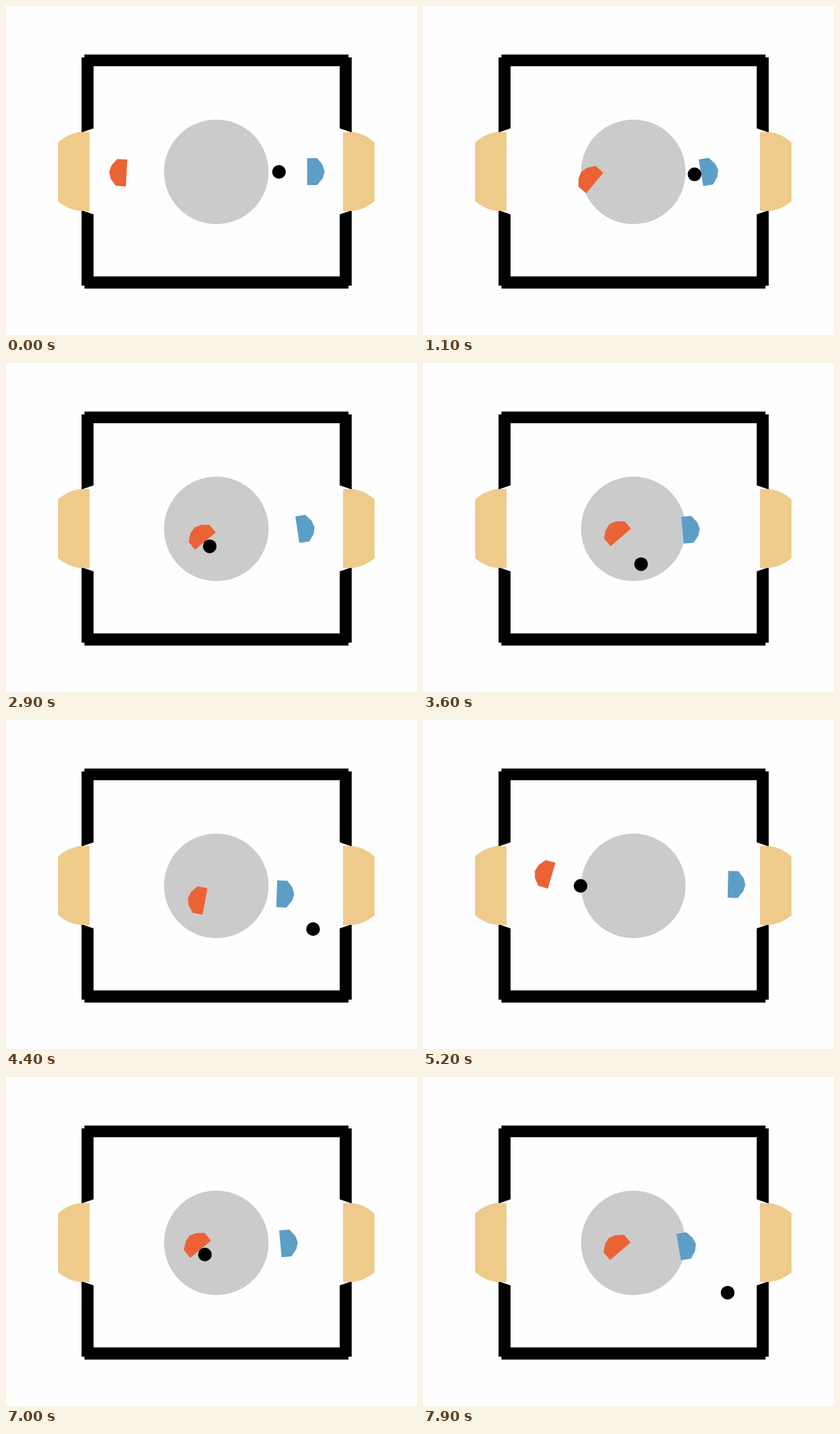
Animation of 600x480 px, one loop 8000 ms. Source, as an HTML page with a canvas:

```html
<!DOCTYPE html>
<html lang="en">
<head>
<meta charset="utf-8">
<title>Air hockey</title>
<style>
html, body { margin: 0; width: 100%; height: 100%; overflow: hidden; background: #fefefe; }
canvas { display: block; }
</style>
</head>
<body>
<canvas id="stage" width="600" height="480"></canvas>
<script>
const ctx = document.getElementById('stage').getContext('2d');
const STEP = 100, STEPS = 80, FLOOR = 382;

// Paddle waypoints: step, x, y, angle in degrees.
// The puck waits, drifts from `push` on, is caught by red at `grab` and shot at `fire`.
const rounds = [
  {
    begin: 0, push: 11, grab: 22, fire: 35, power: 1,
    rest: [396.4, 245.6], drift: [-10.25, 4.36], aim: [298.9, 269.5],
    red: [[0, 171.1, 243.3, 3], [11, 247, 254.9, 39.6], [22, 285.2, 262.1, 44.5],
      [36, 285.5, 250.8, 49.7], [44, 285.7, 263.9, 10.6]],
    blue: [[0, 444.6, 241.7, 0], [11, 410.6, 242.5, -9.8], [27, 437.5, 242.5, -9],
      [36, 383.6, 243.5, -5.2], [44, 400.2, 253.7, 2]]
  },
  {
    begin: 49, push: 57, grab: 57, fire: 71, power: 1.07,
    rest: [230, 242], drift: [0, 0], aim: [299.6, 266],
    red: [[49, 170.5, 241.7, 0], [55, 204, 208, 40], [61, 237.2, 226.8, 58.4],
      [71, 284, 249, 50], [79, 284.8, 250.5, 49.8]],
    blue: [[49, 444.6, 241.7, 0], [58, 460, 235, 4], [79, 378.1, 247.4, -10]]
  }
];

const clamp = v => Math.min(1, Math.max(0, v));
const mix = (a, b, k) => a.map((v, i) => v + (b[i] - v) * k);

// Smooth curve through timed waypoints, at rest at both ends
function follow(keys, n) {
  const last = keys.length - 1;
  const next = keys.findIndex(key => key[0] > n);
  if (next < 0) return keys[last].slice(1);
  const i = next - 1, a = keys[i], b = keys[next];
  const span = b[0] - a[0], k = (n - a[0]) / span;
  const slope = (j, c) => j === 0 || j === last ? 0
    : (keys[j + 1][c] - keys[j - 1][c]) / (keys[j + 1][0] - keys[j - 1][0]);
  return [1, 2, 3].map(c =>
    a[c] + (b[c] - a[c]) * k * k * (3 - 2 * k)
    + span * k * (1 - k) * (slope(i, c) * (1 - k) - slope(next, c) * k));
}

// Slowing shot that rebounds from the lower wall
function shot(n, [x, y], power) {
  const drop = y + power * (24.3 * n - 0.36 * n * n);
  return [x + power * (19.8 * n - 0.356 * n * n), FLOOR - Math.abs(FLOOR - drop)];
}

function inFront([x, y, angle]) {
  const a = angle * Math.PI / 180;
  return [x + 14.8 * Math.cos(a), y + 14.8 * Math.sin(a)];
}

function puckAt(round, n, red) {
  const { push, grab, fire, rest, drift, aim, power } = round;
  if (n >= fire) return shot(n - fire, aim, power);
  const time = Math.max(0, Math.min(n, grab) - push);
  const free = rest.map((v, i) => v + drift[i] * time);
  // Blue nudges the puck slightly before sending it off
  if (n < push) return mix(free, [398.5, 242], round.begin ? 0 : clamp((push - n) / 3));
  return mix(free, inFront(red), clamp((n - grab) / 3));
}

function fillPath(color, trace) {
  ctx.fillStyle = color;
  ctx.beginPath();
  trace();
  ctx.fill();
}

const polygon = (points, color) =>
  fillPath(color, () => points.forEach(([x, y]) => ctx.lineTo(x, y)));
const disc = ([x, y], r, color) =>
  fillPath(color, () => ctx.arc(x, y, r, 0, Math.PI * 2));

const PADDLE = [[-10, 20], [5, 20], [5, -20], [-10, -20], [-18, -10], [-21, 0], [-18, 10]];

function paddle([x, y, angle], side, color) {
  ctx.save();
  ctx.translate(x, y);
  ctx.rotate(angle * Math.PI / 180);
  ctx.scale(0.98 * side, 0.98);
  polygon(PADDLE, color);
  ctx.restore();
}

function walls() {
  polygon([[110.3, 75], [127.8, 75], [127.8, 178.5], [110.3, 184.5]], '#000');
  polygon([[110.3, 298], [127.8, 304], [127.8, 408], [110.3, 408]], '#000');
}

function goal() {
  fillPath('#eecb8a', () => {
    ctx.moveTo(122, 184);
    ctx.lineTo(107, 184);
    ctx.quadraticCurveTo(91, 186, 76, 199);
    ctx.lineTo(76, 285);
    ctx.quadraticCurveTo(91, 297, 107, 299);
    ctx.lineTo(122, 299);
  });
}

function bothSides(part, width) {
  part();
  ctx.save();
  ctx.translate(width, 0);
  ctx.scale(-1, 1);
  part();
  ctx.restore();
}

function draw(n) {
  const round = rounds[n < rounds[1].begin ? 0 : 1];
  const red = follow(round.red, n);
  ctx.fillStyle = '#fefefe';
  ctx.fillRect(0, 0, 600, 480);
  disc([307, 242], 76.3, '#cbcbcb');
  ctx.fillStyle = '#000';
  ctx.fillRect(114.5, 70.8, 385.5, 17);
  ctx.fillRect(114.5, 394.5, 385.5, 17.8);
  bothSides(walls, 615);
  bothSides(goal, 614);
  paddle(red, 1, '#eb6235');
  paddle(follow(round.blue, n), -1, '#5d9ec7');
  disc(puckAt(round, n, red), 10, '#000');
}

const start = performance.now();
function tick() {
  draw(Math.floor((performance.now() - start) / STEP) % STEPS);
  requestAnimationFrame(tick);
}
tick();
</script>
</body>
</html>
```
